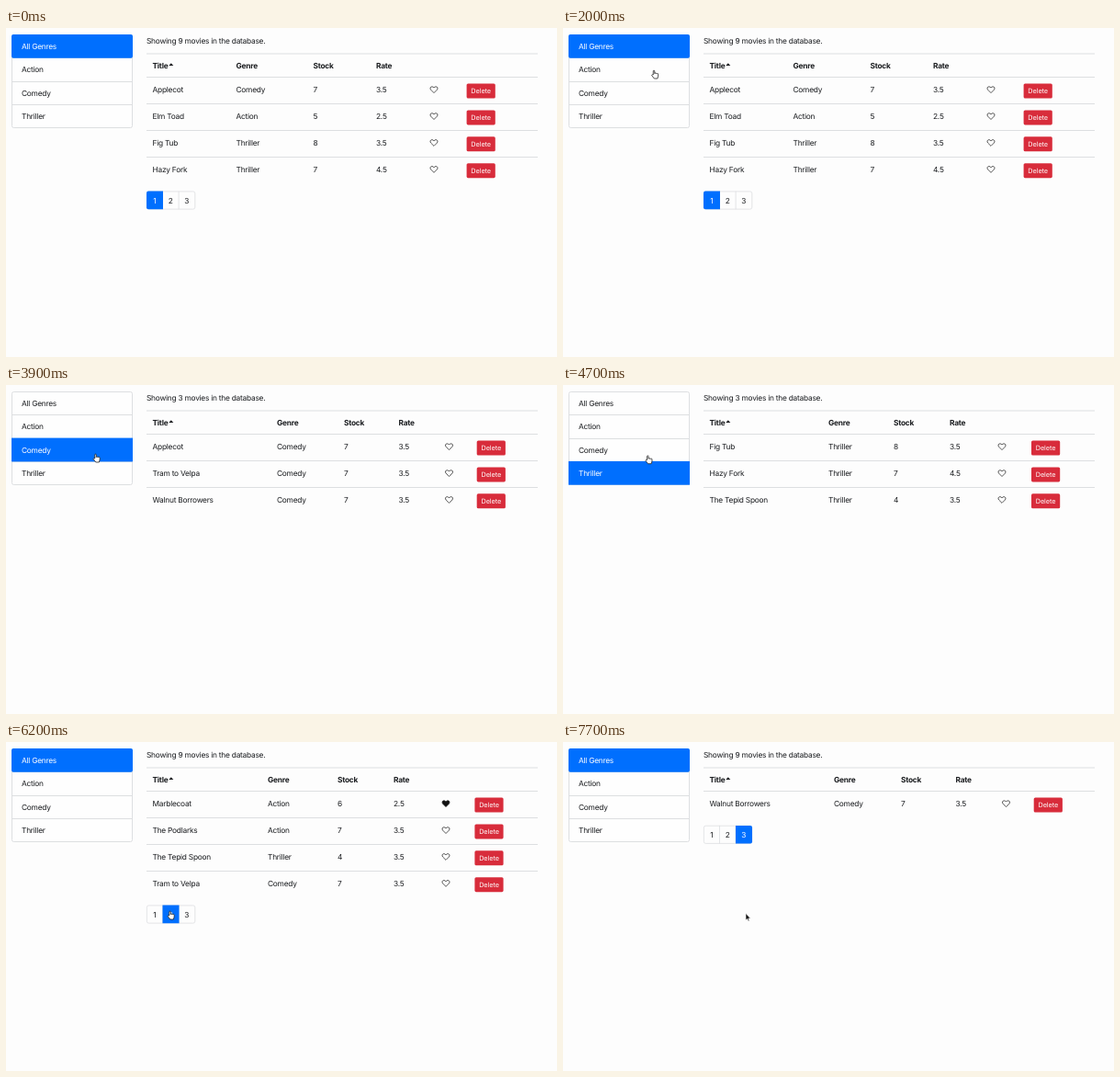
Write an HTML page that moves like this. It is 600 by 358 pixels and loops after 8000 ms.

```html
<!DOCTYPE html>
<html lang="en">
<head>
<meta charset="utf-8">
<title>Movie list</title>
<style>
  html, body { margin: 0; width: 100%; height: 100%; overflow: hidden; background: #fdfdfd; }
  svg { display: block; width: 600px; height: 358px; }
  text {
    font: 8.33px Inter, Roboto, sans-serif;
    letter-spacing: -.028em;
    fill: #1b1d20;
    text-rendering: geometricPrecision;
  }
  .head { font-weight: 700; }
  .mid { text-anchor: middle; }
  .on { fill: #fff; }
  .btn { font-size: 7.3px; letter-spacing: -.01em; fill: #fff; }
</style>
</head>
<body>
<svg viewBox="0 0 600 358">
  <g id="page"></g>
  <g id="cursor" stroke-linejoin="round">
    <path id="hand" fill="#fff" stroke="#222" stroke-width=".8"
      d="M-.75 5V.9a.75.75 0 0 1 1.5 0V3.5a.7.7 0 0 1 1.4.1a.7.7 0 0 1 1.3.2a.65.65 0 0 1 1.2.4V6.2L3.9 9H.3L-2.1 5.9a.7.7 0 0 1 1-1z"/>
    <path id="arrow" fill="#111" stroke="#fff" stroke-width=".6"
      d="M0 0V7.4L1.7 5.9L2.8 8.5L4 8L2.9 5.4H5.2Z"/>
  </g>
</svg>
<script>
const LOOP = 8000, STEP = 100;
const BLUE = '#006ffe', RED = '#d82c3b', LINE = '#dddfe1';
const ROW = 28.9, TOP = 53.7, ITEM = 25.3;
const HEART = 'M0 3.5L-3.4.1C-4.6-1.2-3.9-3.3-2.2-3.3C-1-3.3-.3-2.6 0-2C.3-2.6 1-3.3 2.2-3.3C3.9-3.3 4.6-1.2 3.4.1Z';

const genres = ['All Genres', 'Action', 'Comedy', 'Thriller'];
const movies = [
  ['Applecot', 'Comedy', 7, 3.5],
  ['Elm Toad', 'Action', 5, 2.5],
  ['Fig Tub', 'Thriller', 8, 3.5],
  ['Hazy Fork', 'Thriller', 7, 4.5],
  ['Marblecoat', 'Action', 6, 2.5, true],
  ['The Podlarks', 'Action', 7, 3.5],
  ['The Tepid Spoon', 'Thriller', 4, 3.5],
  ['Tram to Velpa', 'Comedy', 7, 3.5],
  ['Walnut Borrowers', 'Comedy', 7, 3.5]
];

// Column positions: genre, stock, rate, heart centre, button
const wide = [295, 368, 427.5, 482.5, 512.7];
const views = {
  all1: { genre: 0, page: 1, cols: [250.5, 334.5, 403, 466, 501.6] },
  all2: { genre: 0, page: 2, cols: [285, 361, 422, 479, 510.4] },
  all3: { genre: 0, page: 3, cols: wide },
  action: { genre: 1, cols: [277, 344.5, 410.3, 471, 505] },
  comedy: { genre: 2, cols: wide },
  thriller: { genre: 3, cols: [289, 360, 421, 478, 510] }
};

const clicks = [
  [0, 'all1'], [2100, 'action'], [3900, 'comedy'], [4700, 'thriller'],
  [5100, 'all1'], [6200, 'all2'], [7600, 'all3']
];

// Pointer path: time, x, y
const path = [
  [100, 260, 352], [500, 190, 255], [900, 135, 182], [1200, 90, 110],
  [1500, 43, 30], [1800, 88, 39], [2000, 99, 46], [2200, 99, 47.5],
  [2600, 99, 47.5], [3300, 97.5, 75], [4300, 97.5, 75], [4500, 97.5, 92],
  [4600, 97.5, 92], [5100, 71.5, 15.5], [5200, 71.5, 15.5], [5500, 164, 206],
  [5700, 172, 216], [6000, 178.5, 184], [6500, 178.5, 184], [7000, 199, 186.5]
];

const $ = id => document.getElementById(id);
const text = (x, y, s, cls = '') => `<text x="${x}" y="${y}" class="${cls}">${s}</text>`;
const rect = (x, y, w, h, fill, more = '') =>
  `<rect x="${x}" y="${y}" width="${w}" height="${h}" fill="${fill}" ${more}/>`;
const rule = y => rect(153, y, 426, 1, LINE);
const pageTop = rows => TOP + rows * ROW + 8.3;

function rowsOf(view) {
  if (view.page) return movies.slice(view.page * 4 - 4, view.page * 4);
  return movies.filter(m => m[1] === genres[view.genre]);
}

// Rectangle whose left or right corners may be rounded
function cell(x, y, w, h, fill, left, right) {
  const a = left ? 2 : 0, b = right ? 2 : 0;
  return `<path fill="${fill}" d="M${x + a} ${y}H${x + w - b}q${b} 0 ${b} ${b}V${y + h - b}q0 ${b} ${-b} ${b}` +
    `H${x + a}q${-a} 0 ${-a} ${-a}V${y + a}q0 ${-a} ${a} ${-a}z"/>`;
}

function sidebar(active) {
  let out = rect(6.5, 7.5, 131, 101, '#fefefe', `rx="2" stroke="${LINE}"`);
  for (let i = 1; i < 4; i++) out += rect(6.5, Math.round(7 + i * ITEM), 131, 1, LINE);
  out += rect(6, 7 + active * ITEM, 132, 25.8, BLUE, `rx="${active ? 0 : 2}"`);
  genres.forEach((g, i) => out += text(17, 23.1 + i * ITEM, g, i === active ? 'on' : ''));
  return out;
}

function table(view, rows) {
  const [genre, stock, rate, heart, btn] = view.cols;
  let out = rule(27.5) + rule(53) + text(159.5, 44, 'Title', 'head') +
    '<path fill="#1b1d20" d="M177.3 41h5l-2.5-2.8z"/>' +
    text(genre, 44, 'Genre', 'head') + text(stock, 44, 'Stock', 'head') + text(rate, 44, 'Rate', 'head');
  rows.forEach((m, i) => {
    const y = TOP + i * ROW;
    if (i) out += rule(Math.floor(y));
    [159.5, genre, stock, rate].forEach((x, k) => out += text(x, y + 16.1, m[k]));
    out += `<path d="${HEART}" transform="translate(${heart} ${y + 13.4})" ` +
      `fill="${m[4] ? '#111' : 'none'}" stroke="#222" stroke-width=".75"/>`;
    out += rect(btn, y + 6.8, 31.2, 16, RED, 'rx="1.6"') +
      text(btn + 15.6, y + 17.4, 'Delete', 'btn mid');
  });
  return out;
}

function pager(active, hover, y) {
  let out = '';
  for (let n = 1; n < 4; n++) {
    const x = 153 + (n - 1) * 17.6;
    if (n === hover && n !== active) out += cell(x, y, 17.6, 19.8, '#e9ecef', false, n === 3);
  }
  out += rect(153.4, y + .3, 52.4, 19.2, 'none', `rx="2" stroke="${LINE}" stroke-width=".8"`);
  for (const x of [170, 187.7]) out += rect(x, y, .8, 19.6, LINE);
  out += cell(153 + (active - 1) * 17.5, y, 18, 19.7, BLUE, active === 1, active === 3);
  for (let n = 1; n < 4; n++)
    out += text(161.8 + (n - 1) * 17.5, y + 12.9, n, n === active ? 'mid on' : 'mid');
  return out;
}

function draw(view, hover) {
  const rows = rowsOf(view), total = view.page ? movies.length : rows.length;
  return sidebar(view.genre) + text(153, 16.8, `Showing ${total} movies in the database.`) +
    table(view, rows) + (view.page ? pager(view.page, hover, pageTop(rows.length)) : '');
}

const viewAt = t => clicks.filter(c => c[0] <= t).pop()[1];

function pointerAt(t) {
  const i = path.findIndex(p => p[0] > t);
  if (i < 0) return path[path.length - 1].slice(1);
  if (i === 0) return path[0].slice(1);
  const [t0, x0, y0] = path[i - 1], [t1, x1, y1] = path[i];
  const k = (t - t0) / (t1 - t0);
  return [x0 + (x1 - x0) * k, y0 + (y1 - y0) * k];
}

function pageUnder(view, x, y) {
  if (!view.page) return 0;
  const top = pageTop(rowsOf(view).length);
  if (x < 153 || x > 206 || y < top || y > top + 19.8) return 0;
  return Math.min(3, 1 + Math.floor((x - 153) / 17.6));
}

let shown = '';
function render(ms) {
  const t = Math.floor(ms % LOOP / STEP) * STEP;
  const name = viewAt(t), [x, y] = pointerAt(t);
  // The pointer's shape reacts one step after the page changes
  const hover = pageUnder(views[viewAt(Math.max(0, t - STEP))], x, y);
  const overList = x > 6 && x < 138 && y > 7 && y < 109;
  const hand = overList || hover > 0;
  const key = name + hover;
  if (key !== shown) {
    $('page').innerHTML = draw(views[name], hover);
    shown = key;
  }
  $('cursor').setAttribute('transform', `translate(${x} ${y})`);
  $('cursor').style.display = t < 100 ? 'none' : '';
  $('hand').style.display = hand ? '' : 'none';
  $('arrow').style.display = hand ? 'none' : '';
}

const start = performance.now();
function tick() {
  render(performance.now() - start);
  requestAnimationFrame(tick);
}
tick();
</script>
</body>
</html>
```
